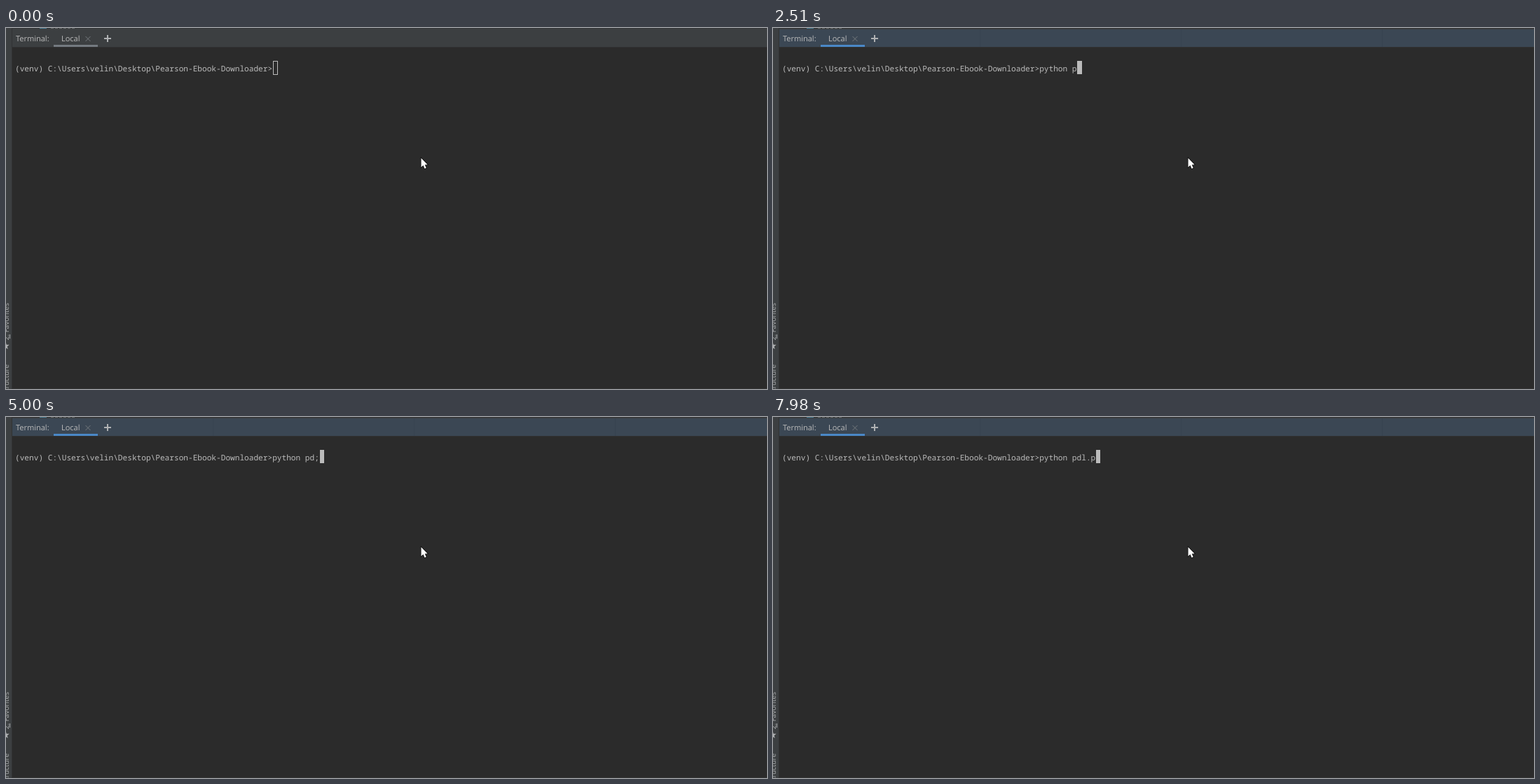
Write an HTML page with a canvas that moves like this. It is 1086x516 px and loops after 8000 ms.

```html
<!DOCTYPE html>
<html lang="en">
<head>
<meta charset="utf-8">
<title>Terminal</title>
<style>
  html, body { margin: 0; width: 100%; height: 100%; overflow: hidden; background: #2b2b2b; }
  canvas { display: block; }
</style>
</head>
<body>
<canvas id="stage" width="1086" height="516"></canvas>
<script>
const ctx = document.getElementById('stage').getContext('2d', { alpha: false });
const W = 1086, H = 516, LOOP = 8000;
const UI = '"Open Sans", "Noto Sans", sans-serif';
const MONO = '11.14px "Noto Sans Mono", "DejaVu Sans Mono", monospace';
const PROMPT = '(venv) C:\\Users\\velin\\Desktop\\Pearson-Ebook-Downloader>';

// [start ms, typed text, cursor style]
const STEPS = [
  [0, '', 'outline'],
  [500, '', 'block'],
  [990, 'p', 'block'],
  [1500, 'pyth', 'block'],
  [1990, 'python', 'block'],
  [2510, 'python p', 'block'],
  [2990, 'python pd', 'block'],
  [3500, 'python pd;', 'block'],
  [3990, 'python pd;.p', 'block'],
  [4510, 'python pd;.py', 'block'],
  [5000, 'python pd;', 'block'],
  [5480, 'python pd', 'block'],
  [5980, 'python pdl', 'block'],
  [6480, 'python pdl.', 'block'],
  [6980, 'python pdl.', 'hidden'],
  [7480, 'python pdl.', 'block'],
  [7980, 'python pdl.p', 'block']
];

function rect(color, x, y, w, h) {
  ctx.fillStyle = color;
  ctx.fillRect(x, y, w, h);
}

function text(str, x, y, font, color, align = 'left') {
  ctx.font = font;
  ctx.fillStyle = color;
  ctx.textAlign = align;
  ctx.fillText(str, x, y);
}

function line(color, width, ...p) {
  ctx.strokeStyle = color;
  ctx.lineWidth = width;
  ctx.beginPath();
  for (let i = 0; i < p.length; i += 4) {
    ctx.moveTo(p[i], p[i + 1]);
    ctx.lineTo(p[i + 2], p[i + 3]);
  }
  ctx.stroke();
}

function sideLabel(str, top) {
  ctx.save();
  ctx.translate(4, top);
  ctx.rotate(-Math.PI / 2);
  text(str, 0, 0, '10px ' + UI, '#a9abad', 'right');
  ctx.restore();
}

function star(cx, cy, r) {
  ctx.fillStyle = '#afb1b3';
  ctx.beginPath();
  for (let i = 0; i < 10; i++) {
    const a = i * Math.PI / 5 - Math.PI / 2, d = i % 2 ? r * 0.42 : r;
    ctx.lineTo(cx + d * Math.cos(a), cy + d * Math.sin(a));
  }
  ctx.fill();
}

function sidebar() {
  rect('#3c3f41', 0, 0, 8, H);
  rect('#323334', 8, 0, 1, H);
  sideLabel('2: Favorites', 393);
  rect('#a9abad', 5, 438, 1, 6);
  star(-0.5, 454.5, 5.5);
  sideLabel('7: Structure', 481);
}

function header(active) {
  rect('#3c3f41', 9, 0, W - 9, 27);
  rect('#333537', 9, 0, W - 9, 1);
  rect('#4a7d96', 48, 0, 10, 1);
  for (let x = 64; x < 95; x += 6) rect('#66696b', x, 0, 4, 1);
  if (active) {
    rect('#3b4754', 9, 2, W - 9, 25);
    for (let x = 295; x < W; x += 287) rect('#374350', x, 2, 1, 25);
  }
  rect('#303132', 9, 27, W - 9, 1);
  rect(active ? '#4a88c7' : '#747a80', 68, 24, 63, 3);
  text('Terminal:', 14, 19, '11px ' + UI, '#bbbbbb');
  text('Local', 79, 19, '11px ' + UI, '#bbbbbb');
  line('#74797d', 1, 113.5, 12, 120.5, 19, 120.5, 12, 113.5, 19);
  line('#afb1b3', 2, 140, 15, 150, 15, 145, 10, 145, 20);
}

function cursor(count, style) {
  const edge = n => Math.round(381 + 6.65 * n);
  const x = edge(count);
  if (style === 'block') {
    rect('#bbbbbb', x, 47, count ? edge(count + 1) - x : 6, 19);
  } else if (style === 'outline') {
    ctx.strokeStyle = '#bbbbbb';
    ctx.lineWidth = 1;
    ctx.strokeRect(x + 0.5, 47.5, 6, 19);
  }
}

function pointer() {
  const p = [0, 0, 0, 13, 2.9, 10.3, 5, 15, 7.2, 14, 5.2, 9.5, 9, 9.2];
  ctx.beginPath();
  for (let i = 0; i < p.length; i += 2) ctx.lineTo(592.5 + p[i], 186 + p[i + 1]);
  ctx.closePath();
  ctx.lineWidth = 1.6;
  ctx.strokeStyle = '#111111';
  ctx.stroke();
  ctx.fillStyle = '#ffffff';
  ctx.fill();
}

function draw(ms) {
  const [, typed, style] = STEPS.findLast(s => s[0] <= ms);
  rect('#2b2b2b', 0, 0, W, H);
  sidebar();
  header(ms >= 500);
  rect('#323334', 9, H - 1, W - 9, 1);
  text(PROMPT + typed, 13, 62, MONO, '#bbbbbb');
  cursor(typed.length, style);
  pointer();
}

ctx.textRendering = 'geometricPrecision';
const start = performance.now();
function tick() {
  draw((performance.now() - start) % LOOP);
  requestAnimationFrame(tick);
}
tick();
</script>
</body>
</html>
```
